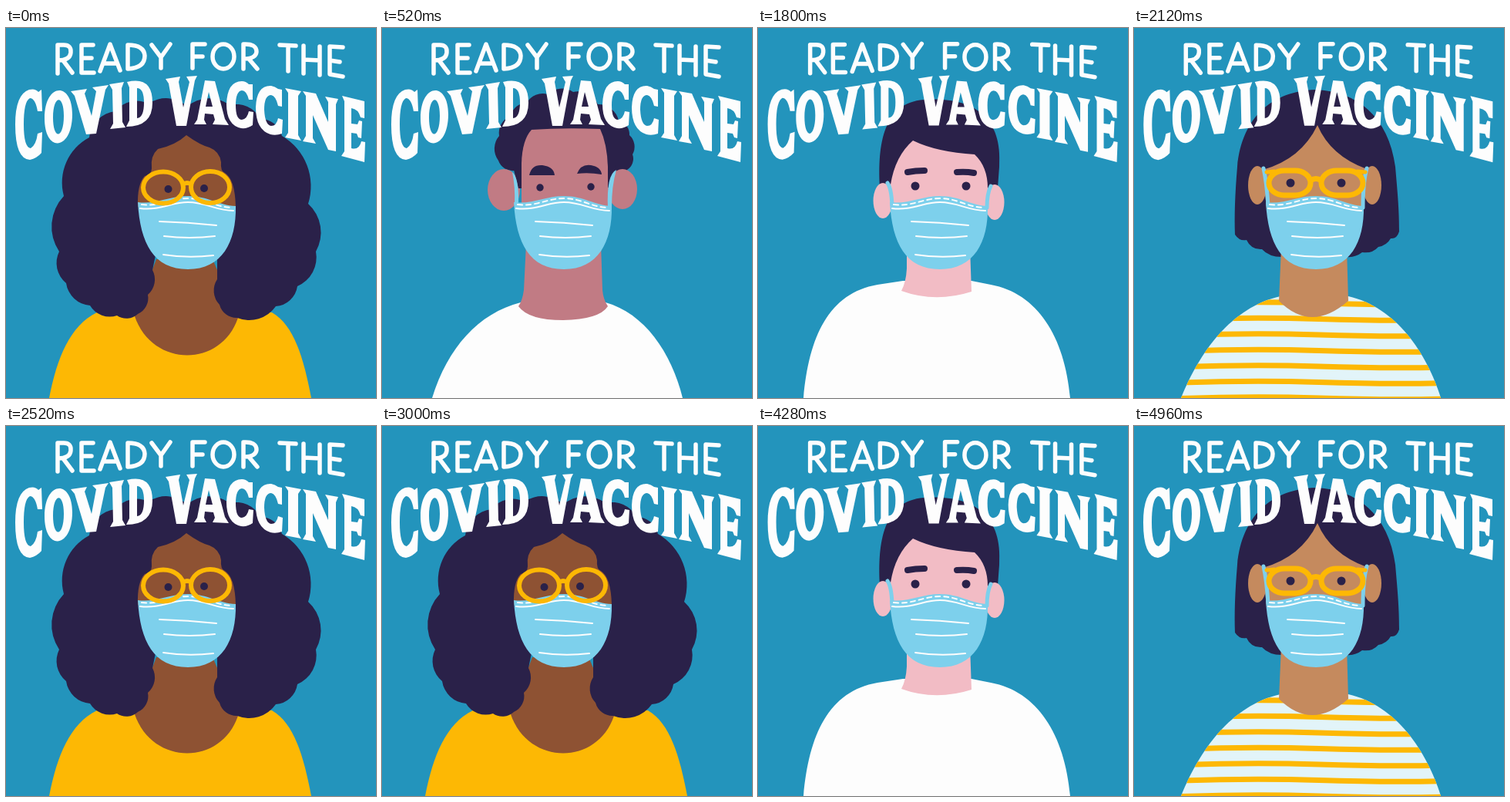
An HTML page that plays this animation: 480x480 px, repeating every 5 s.

```html
<!DOCTYPE html>
<html lang="en">
<head>
<meta charset="utf-8">
<title>Ready for the Covid vaccine</title>
<style>
html, body { margin: 0; width: 100%; height: 100%; overflow: hidden; background: #2394bc; }
svg { display: block; width: 100vw; height: 100vh; }
</style>
</head>
<body>
<svg id="stage" viewBox="0 0 480 480" role="img" aria-label="Ready for the Covid vaccine"></svg>
<script>
const SKY = '#2394bc', HAIR = '#2a2149', GOLD = '#fdb804', MASK = '#7dd0ec', WHITE = '#fdfdfd';

const fill = (color, d) => `<path fill="${color}" d="${d}"/>`;
const line = (color, width, d, extra = '') =>
  `<path fill="none" stroke="${color}" stroke-width="${width}" stroke-linecap="round" stroke-linejoin="round" d="${d}" ${extra}/>`;
const oval = (color, x, y, rx, ry = rx) => `<ellipse fill="${color}" cx="${x}" cy="${y}" rx="${rx}" ry="${ry}"/>`;
const eyes = (x1, y1, x2, y2, r) => oval(HAIR, x1, y1, r) + oval(HAIR, x2, y2, r);

// Outline of outward bumps through clockwise points
function curls(text) {
  const pts = text.split(' ').map(p => p.split(',').map(Number));
  return pts.map(([x, y], i) => {
    if (!i) return `M${x} ${y}`;
    const r = Math.hypot(x - pts[i - 1][0], y - pts[i - 1][1]) * 0.8;
    return `A${r} ${r} 0 0 1 ${x} ${y}`;
  }).join('');
}

const mask = fill(MASK, 'M171 226C195 229 212 218 236 218C262 218 275 230 298 231C299 278 280 313 236 313C192 313 174 280 171 226Z')
  + line(WHITE, 2, 'M174 234C200 237 214 226 236 226C260 226 272 237 295 237')
  + line(WHITE, 2, 'M176 229C200 232 214 221 236 221C260 221 272 233 294 233', 'stroke-dasharray="6 5"')
  + line(WHITE, 2, 'M199 251Q236 252 273 256M205 270Q238 274 271 270M204 294Q236 299 269 295');

const wideStraps = fill(MASK, 'M169 187Q178 194 177 230L172 230Q173 205 169 187ZM304 184Q291 190 293 234L298 232Q298 205 304 184Z');
const thinStraps = line(MASK, 5, 'M168 201Q173 208 174 230M302 205Q297 215 297 233');

const afro = () => {
  const skin = '#8e5233';
  return fill(GOLD, 'M56 480C66 428 83 386 118 369H345C374 386 386 428 396 480Z')
    + fill(skin, 'M167 374C190 441 279 441 301 376L268 300H195Z')
    + fill(HAIR, curls('190,314 184,346 171,371 144,373 109,360 78,331 69,290 75,218 108,142 142,108 185,98 235,102 290,100 330,118 358,140 392,228 402,290 378,335 350,361 300,376 277,359 274,326') + 'L274 285H196Z')
    + fill(skin, 'M171 232Q170 202 180 192Q189 190 189 182Q187 166 197 157Q220 152 234 139Q252 152 264 155Q277 160 279 174Q278 186 284 188Q297 196 298 232Z')
    + mask
    + '<g fill="none" stroke="#fdb804" stroke-width="6"><ellipse cx="204" cy="207" rx="26" ry="20.500"/><ellipse cx="265" cy="206.500" rx="25" ry="20.500"/><path d="M229 203Q235 199 241 203"/></g>'
    + eyes(210.5, 209, 257, 208, 5);
};

const curlyMan = () => {
  const skin = '#c17b84';
  return fill(WHITE, 'M65 480C85 415 125 370 180 356H290C340 370 375 420 390 480Z')
    + fill(skin, 'M187 280L184 340Q182 354 177 361Q190 379 235 379Q282 378 293 361Q287 352 286 340L284 280Z')
    + fill(HAIR, curls('172,185 151,172 152,140 167,114 188,97 215,86 248,83 280,99 307,120 321,139 325,164 318,184 298,187') + 'L294 208H180Z')
    + oval(skin, 158, 210, 21, 27) + oval(skin, 312, 209, 19, 26)
    + fill(HAIR, 'M170 180H182V208H177ZM290 178H304L296 207H291Z')
    + fill(skin, 'M181 235V175Q182 145 194 132Q235 129 283 131Q292 150 293 180V235Z')
    + wideStraps + mask
    + fill(HAIR, 'M191 191Q194 177 208 178Q223 180 224 191ZM253 189Q258 176 271 178Q284 180 285 190Q268 187 253 189Z')
    + eyes(205, 207, 271, 206, 4.7);
};

const longHair = () => {
  const skin = '#f2b594';
  return fill(HAIR, 'M235 88C180 88 150 130 148 200C146 250 117 280 118 330C119 360 106 380 102 408L160 380H300L353 409C361 370 356 310 338 276C325 250 321 225 320 190C315 130 290 88 235 88Z')
    + line(SKY, 2.5, 'M138 248C119 290 128 325 114 382M328 258C351 300 343 330 352 380')
    + fill(GOLD, 'M78 480C84 420 103 386 150 368H308C345 382 365 420 366 480Z')
    + fill(skin, 'M148 370C172 436 288 436 308 368Q276 356 271 300H197Q202 350 148 370Z')
    + oval(skin, 160, 205, 12, 25) + oval(skin, 309, 206, 13, 24)
    + fill(skin, 'M172 235V190Q179 153 199 132Q235 157 290 157Q299 180 299 235Z')
    + line(HAIR, 3.5, 'M218 145Q247 169 288 166')
    + wideStraps + mask
    + line(HAIR, 5, 'M194 188Q207 175 223 186M256 187Q270 177 285 186')
    + eyes(204, 206, 271, 206, 4.7);
};

const shortHair = () => {
  const skin = '#f2bcc5';
  return fill(WHITE, 'M59 480C66 400 92 344 155 333L188 328H277L302 333C362 344 398 400 405 480Z')
    + fill(skin, 'M193 285V312Q192 330 186 341Q230 357 277 342L275 285Z')
    + fill(HAIR, 'M158 206C155 150 163 97 215 93C275 89 318 112 313 180L311 207H298V235H172V206Z')
    + oval(skin, 162, 224, 12.5, 23) + oval(skin, 307, 226, 12.5, 23)
    + fill(skin, 'M172 235V203Q178 166 201 146Q232 161 281 164Q298 180 298 208V235Z')
    + thinStraps + mask
    + line(HAIR, 8, 'M194 187Q204 185 216 185M258 187Q270 186 280 188')
    + eyes(204, 205, 270, 205, 5.5);
};

const bob = () => {
  const skin = '#c58a5e';
  const shirt = 'M61 480C84 422 126 362 190 348H278C340 362 380 422 398 480Z';
  let stripes = '';
  for (let y = 357; y < 490; y += 20.5) stripes += `M50 ${y + 1}Q150 ${y - 3} 240 ${y}T410 ${y + 1}`;
  return fill(HAIR, 'M235 80C180 82 140 115 134 180C131 215 130 245 131 268Q137 277 146 275Q152 288 166 287Q175 297 192 297H276Q287 298 296 291Q309 293 317 284Q328 282 333 273Q341 274 344 264C344 235 342 215 339 180C330 115 290 82 235 80Z')
    + `<clipPath id="shirt"><path d="${shirt}"/></clipPath>` + fill('#e2f4f9', shirt)
    + line(GOLD, 7, stripes, 'clip-path="url(#shirt)"')
    + fill(skin, 'M191 285L188 354Q230 396 278 354L276 285Z')
    + oval(skin, 160, 204, 12, 25) + oval(skin, 309, 204, 12, 25)
    + fill(skin, 'M172 235L167 184Q217 170 238 126Q255 166 302 183L298 235Z')
    + line(MASK, 5, 'M168 182Q172 200 174 230M302 182Q297 200 297 233')
    + mask
    + '<g fill="none" stroke="#fdb804" stroke-width="7"><rect x="175" y="185" width="54" height="32" rx="20" ry="16"/><rect x="243" y="185" width="54" height="32" rx="20" ry="16"/><path d="M229 198Q236 193 243 198"/></g>'
    + line(GOLD, 5, 'M172 187L182 186M300 187L290 186')
    + eyes(203, 201, 269, 201, 5.5);
};

// Hand lettering, one path per letter
const thin = [
  'M67 59V22H75Q85 22 84 32Q83 42 68 42M74 42L86 58',
  'M113 22H98V58H114M98 39H111',
  'M122 56L135 21L148 55M127 46H143',
  'M158 22V53Q180 52 180 36Q179 22 158 22Z',
  'M189 22L201 38L213 21M201 38V52',
  'M242 52V21H258M242 37H255',
  'M268 37A14 16 0 0 1 296 37A14 16 0 0 1 268 37Z',
  'M308 53V21Q325 20 325 31Q324 40 308 40M315 40L326 53',
  'M355 22L376 23M366 23V56',
  'M386 23V59M407 24V61M386 41L407 42',
  'M437 25L420 24V60L437 63M420 42L433 44'
];
const bold = [
  'M46 80L47 108L41 108Q38 91 31 91Q23 95 23 125Q23 155 32 156Q39 152 41 137L47 135L46 162Q40 169 31 171Q12 170 12 125Q12 86 30 80Q38 78 42 83Z',
  'M50 117C50 71 86 69 86 112C86 159 50 163 50 117ZM61 116C61 146 75 144 75 114C75 85 61 87 61 116Z',
  'M84 82L105 79L102 85L111 114L117 82L112 77L133 74L129 80L117 137L104 138L89 88Z',
  'M134 73L153 70L150 78L151 122L155 129L135 131L139 124L138 80Z',
  'M157 70Q190 62 190 97Q190 128 156 128L160 120V77ZM170 78V117Q179 116 179 97Q179 78 170 78Z',
  'M207 66L226 63L224 70L230 103L238 70L234 63L248 62L245 68L234 127L221 127L211 72Z',
  'M258 68L271 69L284 118L289 126L268 125L271 119L269 112L258 111L257 119L260 125L244 125L248 119ZM263 83L259 102L268 102Z',
  'M320 73V93L315 93Q312 81 306 81Q298 82 298 100Q298 119 306 119Q313 118 315 108L321 109L320 126Q313 131 305 130Q286 126 286 99Q287 69 306 69Q311 69 315 73Z',
  'M358 80V102L353 101Q350 88 344 87Q335 87 335 106Q336 126 344 127Q351 127 353 117L359 119L358 137Q350 140 343 138Q324 132 324 103Q325 74 344 75Q349 76 353 79Z',
  'M362 78L383 82L379 88V139L383 146L362 142L366 136V84Z',
  'M385 82L402 85L418 122V96L414 89L431 92L428 99V160L418 158L398 113V143L402 150L385 147L389 140V88Z',
  'M436 88L465 95V117L460 116Q457 105 448 104V124L456 125L458 120L462 121L461 143L457 142L455 137L448 136V156Q458 159 461 147L466 148L465 174L435 166L439 160V95Z'
];

const stage = document.getElementById('stage');
const group = body => `<g>${body}</g>`;
stage.innerHTML = `<rect width="480" height="480" fill="${SKY}"/>`
  + `<g id="people">${[afro, curlyMan, longHair, shortHair, bob].map(p => group(p())).join('')}</g>`
  + `<g id="title" fill-rule="evenodd">${thin.map(d => group(line(WHITE, 5.5, d))).join('')}${bold.map(d => group(fill(WHITE, d))).join('')}</g>`;
const people = [...document.getElementById('people').children];
const letters = [...document.getElementById('title').children];

function draw(now) {
  const t = Math.floor(now % 5000 / 40) * 40;
  const shown = Math.max(0, Math.ceil(t / 500) - 1) % 5;
  people.forEach((p, i) => p.style.display = i === shown ? '' : 'none');

  // Lettering trembles slightly, six poses a second
  const pose = Math.floor((t + 70) * 6 / 1000) % 3;
  letters.forEach((l, i) => {
    const dx = pose * 0.35 * Math.sin(i * 2.3 + pose), dy = pose * 0.35 * Math.cos(i * 1.7 + pose);
    l.setAttribute('transform', `translate(${dx.toFixed(2)} ${dy.toFixed(2)})`);
  });
}

const start = performance.now();
function tick() {
  draw(performance.now() - start);
  requestAnimationFrame(tick);
}
tick();
</script>
</body>
</html>
```
